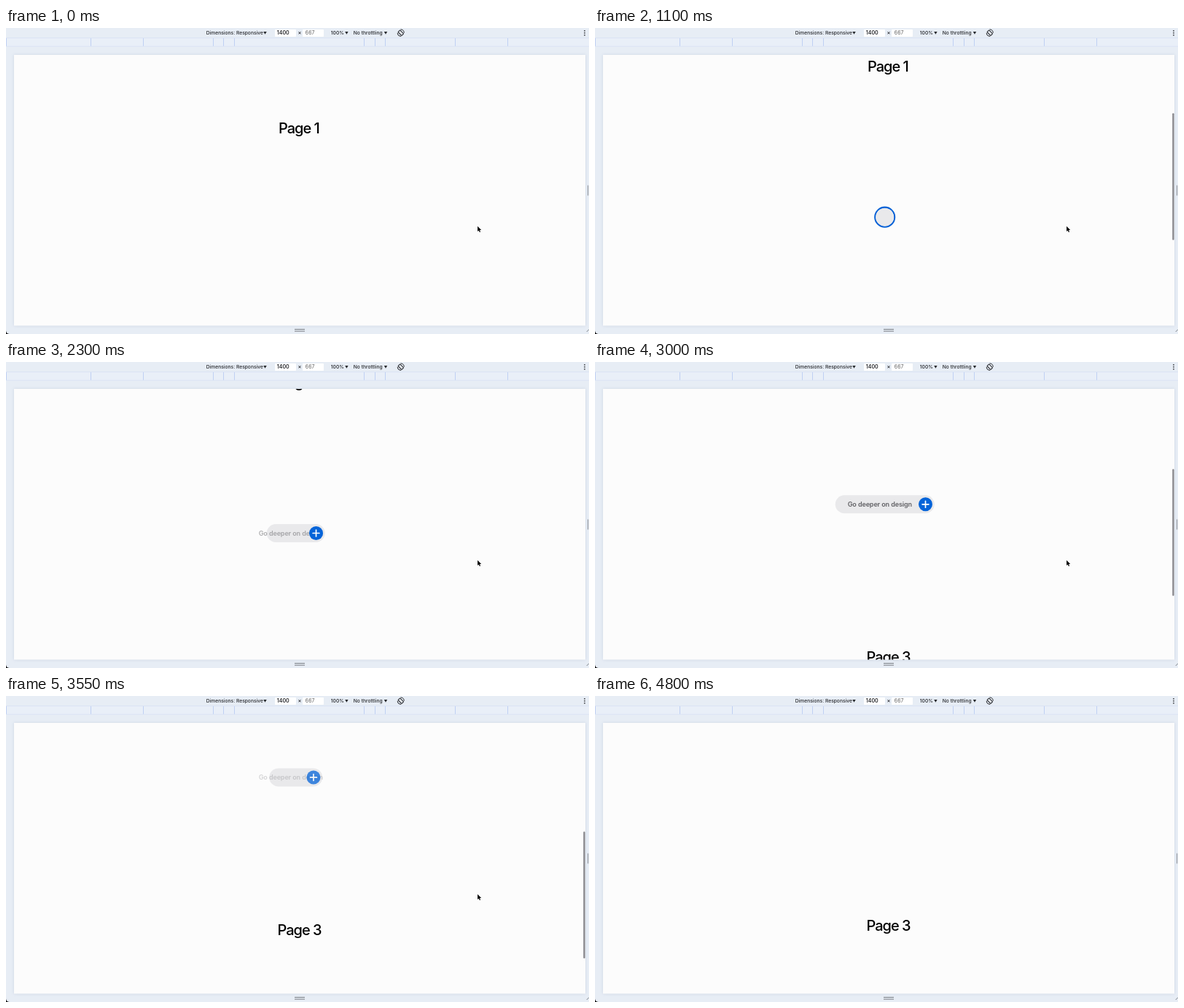
An HTML page for the animation above (5.1 s loop, 800 by 421 pixels).

```html
<!DOCTYPE html>
<html lang="en">
<head>
<meta charset="utf-8">
<title>Responsive page preview</title>
<style>
  html, body { margin: 0; width: 100%; height: 100%; overflow: hidden; background: #e7edf5; }
  svg { display: block; width: 800px; height: 421px; font-family: Inter, "Open Sans", sans-serif; }
  .bar { font-size: 6.7px; font-weight: 500; fill: #26282c; }
  .heading { font-size: 20px; font-weight: 450; letter-spacing: -1px; fill: #000; }
  .label { font-size: 9.1px; font-weight: 600; letter-spacing: -.15px; fill: #626266; }
  .page { filter: drop-shadow(0 0 2px rgba(80, 100, 140, .16)); }
</style>
</head>
<body>
<svg viewBox="0 0 800 421">
  <defs>
    <clipPath id="view"><rect x="11" y="37" width="784" height="372.5"/></clipPath>
    <path id="caret" d="M0 0h4.4l-2.2 3.8z" fill="#26282c"/>
  </defs>
  <rect width="800" height="421" fill="#e7edf5"/>

  <g class="bar">
    <rect x="369" y="2" width="29" height="10" rx="1" fill="#fff"/>
    <rect x="407" y="2" width="29" height="10" rx="1" fill="#fff"/>
    <text x="274.8" y="9.2">Dimensions: Responsive</text>
    <text x="371.8" y="9.2" font-size="7" font-weight="600">1400</text>
    <text x="400.4" y="9.2" font-size="7.4">×</text>
    <text x="410.8" y="9.2" font-size="7" font-weight="400" fill="#666">667</text>
    <text x="445.8" y="9.2">100%</text>
    <text x="476.8" y="9.2">No throttling</text>
    <use href="#caret" x="353.3" y="5"/>
    <use href="#caret" x="465.2" y="5"/>
    <use href="#caret" x="518.8" y="5"/>
  </g>
  <g fill="none" stroke="#303236" stroke-width="1.1">
    <rect x="539.9" y="3.2" width="3.8" height="7" rx=".6" transform="rotate(-45 541.8 6.7)"/>
    <path d="M541.4 2a4.9 4.9 0 0 1 5 4.6M542.2 11.4a4.9 4.9 0 0 1-5-4.6"/>
  </g>
  <g fill="#303236">
    <circle cx="794" cy="3.8" r=".9"/><circle cx="794" cy="6.8" r=".9"/><circle cx="794" cy="9.8" r=".9"/>
  </g>

  <rect y="14" width="800" height="11" fill="#e9eff8"/>
  <path id="ruler" stroke="#bfd0f3"/>
  <path d="M0 13.7H800M0 25.2H800" stroke="#d5e0f4" stroke-width=".7"/>

  <rect class="page" x="11" y="37" width="784" height="372.5" fill="#fcfcfc"/>
  <g clip-path="url(#view)">
    <g id="content">
      <text class="heading" x="374" y="145.3">Page 1</text>
      <text class="heading" x="372.4" y="563">Page 3</text>
      <g id="pill" transform="translate(397.7 345.5)">
        <circle id="ring" r="13.4" fill="none" stroke="#0561d6" stroke-width="2.3"/>
        <rect id="body" y="-12.5" height="25" rx="12.5" fill="#e9e9eb"/>
        <text id="label" class="label" x="-51" y="3.4">Go deeper on design</text>
        <g id="plus">
          <circle r="9.5" fill="#0564d9"/>
          <path d="M-4.4 0H4.4M0-4.4V4.4" stroke="#fff" stroke-width="1.7" stroke-linecap="round"/>
        </g>
      </g>
    </g>
    <rect id="thumb" x="792.3" width="2.3" height="174.5" rx="1.1" fill="#85858a"/>
  </g>

  <path d="M396 414.6h14M396 417.1h14" stroke="#777b82"/>
  <path d="M798.6 216.5v14" stroke="#8b8f96"/>
  <path d="M796.8 418l3.2-3.4" stroke="#777b82" stroke-width=".9"/>
  <path d="M0 416.5q.4 4 4.5 4.5H0z" fill="#111"/>
  <path id="cursor" d="M647.1 272.8v7.2l1.6-1.5 1.2 2.6 1.2-.5-1.1-2.5h2.2z" stroke="#fff" stroke-width=".7" paint-order="stroke"/>
</svg>
<script>
  const LOOP = 5100, STEP = 50;
  const el = id => document.getElementById(id);
  const set = (id, name, value) => el(id).setAttribute(name, value);

  // Rises from 0 to 1 between start and end; a power above 1 slows the finish.
  function ramp(time, start, end, power = 1) {
    const u = Math.min(1, Math.max(0, (time - start) / (end - start)));
    return 1 - (1 - u) ** power;
  }

  // The ruler's breakpoints mirror around the middle of the page.
  const MIDDLE = 402.5;
  const marks = [89, 104, 118, 214, 286].flatMap(gap => [MIDDLE - gap, MIDDLE + gap]);
  set('ruler', 'd', [0.5, ...marks].map(x => `M${x} 14V25`).join(''));

  function draw(t) {
    const scroll = 110 * ramp(t, 50, 1650, 1.4) + 130 * ramp(t, 2850, 3750, 2);
    const width = 25 + 111 * (ramp(t, 2050, 2750, 1.55) - ramp(t, 3400, 3750, 1.5));
    const opacity = {
      thumb: ramp(t, 50, 150) - ramp(t, 1750, 2050) + ramp(t, 2850, 2950) - ramp(t, 4050, 4350),
      pill: ramp(t, 700, 900) - ramp(t, 4050, 4350),
      ring: 1 - ramp(t, 1650, 1950),
      label: ramp(t, 2100, 2500) - ramp(t, 3400, 3600),
      plus: ramp(t, 2050, 2200) - ramp(t, 3500, 3700),
      cursor: t < 4800 ? 1 : 0
    };
    set('content', 'transform', `translate(0 ${-scroll})`);
    set('thumb', 'y', 77.3 + scroll * .468);
    set('body', 'x', -width / 2);
    set('body', 'width', width);
    set('plus', 'transform', `translate(${width / 2 - 12.2} 0)`);
    for (const id in opacity) set(id, 'opacity', opacity[id]);
  }

  const start = performance.now();
  function tick() {
    const time = (performance.now() - start) % LOOP;
    draw(Math.floor(time / STEP) * STEP);
    requestAnimationFrame(tick);
  }
  tick();
</script>
</body>
</html>
```
